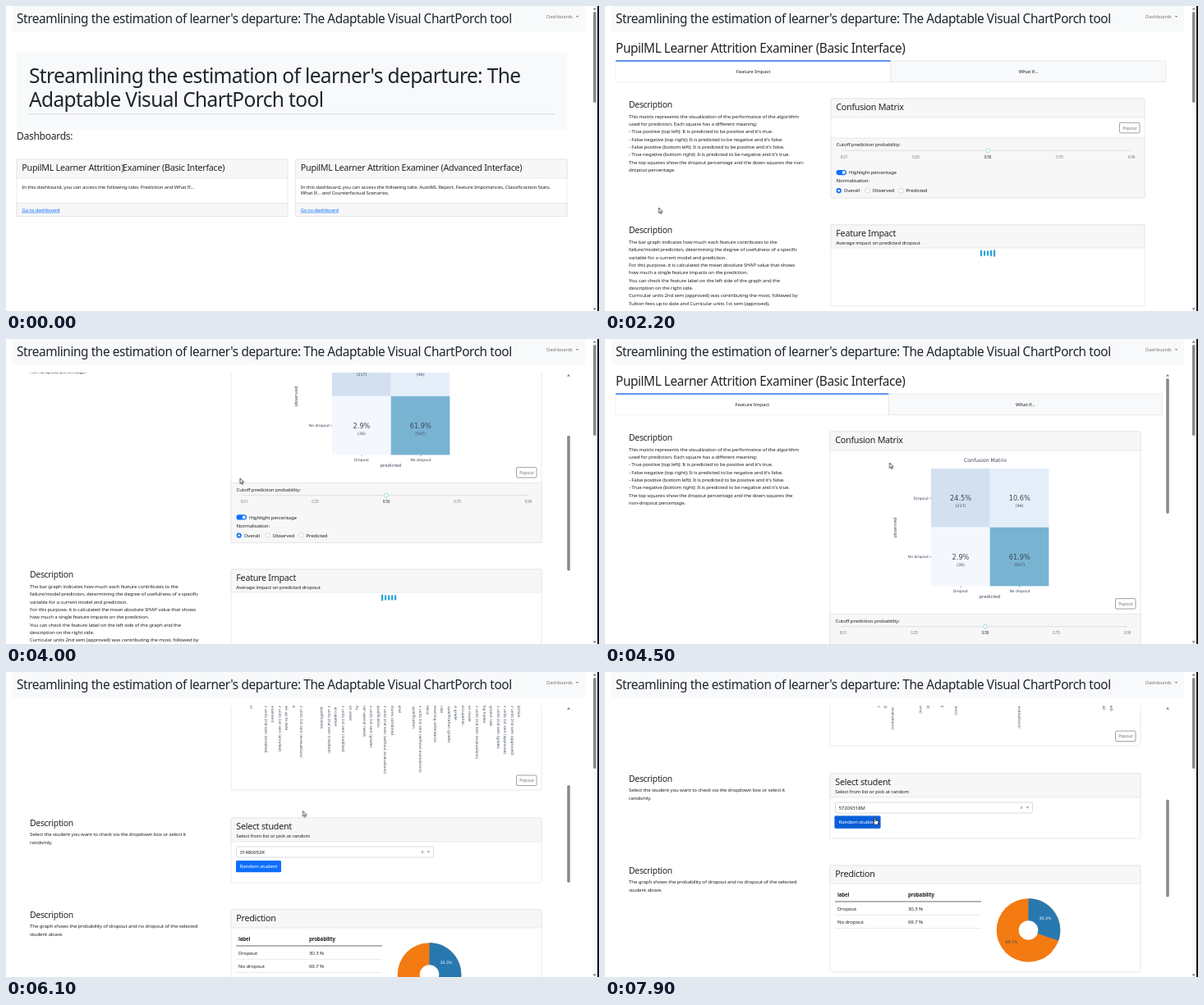
These frames come from a looping animation (722x372 px, 8000 ms). An HTML page:

```html
<!DOCTYPE html>
<html lang="en">
<head>
<meta charset="utf-8">
<title>Dashboard walkthrough</title>
<style>
@property --s { syntax: "<number>"; inherits: true; initial-value: 0; }
html, body { margin: 0; height: 100%; overflow: hidden; background: #fff; }
svg { display: block; width: 722px; height: 372px; }
text { font-family: "Noto Sans", sans-serif; letter-spacing: -.026em; fill: #212529; white-space: pre; }
.plot { font-family: "DejaVu Sans", sans-serif; letter-spacing: 0; fill: #3c4858; }
.mid { text-anchor: middle; }
.mute { fill: #777; }
.link { fill: #0d6efd; text-decoration: underline; }
.bold { font-weight: 700; }
.white { fill: #fff; }

.home, .load, .basic, .whatif, .matrix, .before, .after, .wait, .bars, .ibeam, .arrow, .hand {
  animation: 8s step-end infinite;
}
.home { animation-name: home; }
.load { animation-name: load; }
.basic { animation-name: basic; }
.whatif { animation-name: whatif; }
.matrix { animation-name: matrix; }
.before { animation-name: before; }
.after { animation-name: after; }
.wait { animation-name: wait; }
.bars { animation-name: bars; }
.ibeam { animation-name: ibeam; }
.arrow { animation-name: arrow; }
.hand { animation-name: hand; }
@keyframes home { 0% { opacity: 1 } 15%, 100% { opacity: 0 } }
@keyframes load { 0% { opacity: 0 } 15% { opacity: 1 } 31.25%, 100% { opacity: 0 } }
@keyframes basic { 0% { opacity: 0 } 31.25% { opacity: 1 } 67.5%, 100% { opacity: 0 } }
@keyframes whatif { 0% { opacity: 0 } 67.5%, 100% { opacity: 1 } }
@keyframes matrix { 0% { opacity: 0 } 37.5%, 100% { opacity: 1 } }
@keyframes before { 0% { opacity: 1 } 97.5%, 100% { opacity: 0 } }
@keyframes after { 0% { opacity: 0 } 97.5%, 100% { opacity: 1 } }
@keyframes wait { 0% { opacity: 1 } 71.25%, 100% { opacity: 0 } }
@keyframes bars { 0% { opacity: 0 } 71.25%, 100% { opacity: 1 } }
@keyframes ibeam { 0% { opacity: 1 } 1.25%, 100% { opacity: 0 } }
@keyframes arrow { 0% { opacity: 0 } 1.25% { opacity: 1 } 11.25% { opacity: 0 } 16.25% { opacity: 1 } 95%, 100% { opacity: 0 } }
@keyframes hand { 0% { opacity: 0 } 11.25% { opacity: 1 } 16.25% { opacity: 0 } 95%, 100% { opacity: 1 } }

.scroll1 { animation: scroll1 8s linear infinite; }
.scroll2 { animation: scroll2 8s linear infinite; }
.page { transform: translateY(calc(var(--s) * -1px)); }
.thumb { transform: translateY(calc(var(--s) * var(--k) * 1px)); }
@keyframes scroll1 {
  0%, 44.9% { --s: 0 }
  45%, 46.2% { --s: 78 }
  48.75%, 51.25% { --s: 160 }
  54%, 100% { --s: 0 }
}
@keyframes scroll2 {
  0%, 71.25% { --s: 0 }
  75.5%, 77.5% { --s: 275 }
  85.5%, 89% { --s: 709 }
  94%, 100% { --s: 329 }
}

.cursor { animation: move 8s linear infinite; }
@keyframes move {
  0%, 1.25% { transform: translate(142px, 198px) }
  10%, 16.25% { transform: translate(55px, 253px) }
  24%, 31.25% { transform: translate(65.5px, 246px) }
  36.25%, 46.25% { transform: translate(238.5px, 184px) }
  55%, 57.5% { transform: translate(346.5px, 151px) }
  62.5%, 64.9% { transform: translate(433px, 81px) }
  65%, 68% { transform: translate(434px, 82px) }
  75%, 91% { transform: translate(361.5px, 169.5px) }
  96%, 100% { transform: translate(328px, 178px) }
}
.spin rect { transform-box: fill-box; transform-origin: center; animation: pulse .8s ease-in-out infinite; }
@keyframes pulse { 0%, 50%, 100% { transform: none } 25% { transform: scaleY(1.35) } }
</style>
</head>
<body>
<svg id="stage" viewBox="0 0 722 372" xmlns="http://www.w3.org/2000/svg"></svg>
<script>
const BASE = 6.15, H3 = 10.75, H2 = 15.35;
const GRAY = '#f7f7f7', LINE = '#dfe1e3', BLUE = '#0d6efd';
const LEAD = "Streamlining the estimation of learner's departure: The";
const REST = 'Adaptable Visual ChartPorch tool';
const APP = 'PupilML Learner Attrition Examiner';
const IDS = ['31480652K', '57209318M'];

// y is the vertical middle of the capitals
const text = (x, y, size, str, cls = '', extra = '') =>
  `<text x="${x}" y="${(y + size * .36).toFixed(2)}" font-size="${size}" class="${cls}" ${extra}>${str}</text>`;
const rect = (x, y, w, h, fill, stroke = 'none', rx = 0) =>
  `<rect x="${x}" y="${y}" width="${w}" height="${h}" fill="${fill}" stroke="${stroke}" stroke-width=".7" rx="${rx}"/>`;
const hline = (x1, x2, y, color = LINE, w = .7) =>
  `<path d="M${x1} ${y}H${x2}" stroke="${color}" stroke-width="${w}"/>`;
const dot = (x, y, r, fill, stroke = 'none', w = .7) =>
  `<circle cx="${x}" cy="${y}" r="${r}" fill="${fill}" stroke="${stroke}" stroke-width="${w}"/>`;
const group = (cls, body, extra = '') => `<g class="${cls}" ${extra}>${body}</g>`;
const lines = (x, y, rows, step = 9.35) =>
  rows.map((row, i) => text(x, y + i * step, BASE, row)).join('');
const caret = (x, y, fill = '#888') => `<path d="M${x - 1.8} ${y - 1}h3.6l-1.8 2z" fill="${fill}"/>`;
const expand = s => s.replace(/^C(\d)/, (_, n) => `Curricular units ${n}${n == 1 ? 'st' : 'nd'} sem`);

function card(x, y, w, h, head, title, sub) {
  return rect(x, y, w, h, '#fff', LINE, 1.5) + rect(x, y, w, head, GRAY, LINE, 1) +
    text(x + 6.3, y + 10, H3, title) + (sub ? text(x + 6.3, y + 21.5, BASE, sub) : '');
}

const popout = (right, y) => rect(right - 24.5, y, 24.5, 12.5, '#fff', '#777', 1.5) +
  text(right - 12.2, y + 6.3, 5.3, 'Popout', 'mid mute');

function spinner(x, y) {
  let out = '';
  for (let i = 0; i < 5; i++) {
    const h = i ? 6 : 7.5;
    out += `<rect x="${x + i * 4}" y="${y - h / 2}" width="2.2" height="${h}" fill="#29a3db" style="animation-delay:${i * .1 - .8}s"/>`;
  }
  return group('spin', out);
}

function tabs(right, active) {
  const half = (right - 13) / 2;
  const tab = (name, i) => {
    const x = 13 + i * half, on = i === active;
    return rect(x, 67, half, 25.5, on ? '#fff' : '#f8f9fa', on ? '#eceef0' : LINE) +
      (on ? hline(x, x + half, 67, '#2f74e8', 1.5) : '') +
      text(x + half / 2, 80, BASE, name, 'mid');
  };
  return text(13, 51, H2, APP + ' (Basic Interface)') + tab('Feature Impact', 0) + tab('What if...', 1);
}

function confusion() {
  const cells = [[397, 158, '#d2e0f0', '24.5%', 217], [468.7, 158, '#e5eff9', '10.6%', 94],
    [397, 229.7, '#f4f8fe', '2.9%', 26], [468.7, 229.7, '#79b3d2', '61.9%', 547]];
  let out = text(463, 148, 6.2, 'Confusion Matrix', 'plot mid');
  for (const [x, y, fill, pct, n] of cells)
    out += rect(x, y, 71.7, 71.7, fill) + text(x + 36, y + 36.2, 8.2, pct, 'plot mid') +
      text(x + 36, y + 45.3, 4.8, `(${n})`, 'plot mid');
  ['Dropout', 'No dropout'].forEach((name, i) => {
    const x = 433 + i * 72, y = 194 + i * 71.7;
    out += text(394, y, 4.5, name, 'plot', 'text-anchor="end"') + hline(395, 397, y, '#555', .6) +
      text(x, 307.5, 4.5, name, 'plot mid') + `<path d="M${x} 301.5v1.8" stroke="#555" stroke-width=".6"/>`;
  });
  return out + text(468.5, 314, 5.4, 'predicted', 'plot mid') +
    text(0, 0, 5.4, 'observed', 'plot mid', 'transform="translate(353 230) rotate(-90)"');
}

// d: extra height taken by the plot
function matrixCard(x, w, d) {
  const right = x + w, foot = 161 + d, step = (w - 32) / 4, r = [9.7, 44.5, 85.5];
  let out = card(x, 113, w, 121 + d, 23, 'Confusion Matrix') + popout(right - 6, 142.3 + d) +
    rect(x, foot, w, 73 + d - d, GRAY, LINE) +
    text(x + 6.5, foot + 8, BASE, 'Cutoff prediction probability:') +
    hline(x + 13, right - 16, foot + 15.3, '#e3e3e3', 1.3);
  ['0.01', '0.25', '0.50', '0.75', '0.99'].forEach((v, i) =>
    out += text(x + 16 + i * step, foot + 23.3, 4.6, v, i === 2 ? 'mid' : 'mid mute'));
  out += dot(x + 16 + 2 * step, foot + 15.3, 2.5, '#fff', '#a4dbe8', 1) +
    rect(x + 6.5, foot + 39, 12.5, 6.2, BLUE, 'none', 3.1) + dot(x + 15.7, foot + 42.1, 2, '#fff') +
    text(x + 22, foot + 42.1, BASE, 'Highlight percentage') +
    text(x + 6.5, foot + 52, BASE, 'Normalisation:');
  ['Overall', 'Observed', 'Predicted'].forEach((name, i) => {
    const cx = x + r[i], cy = foot + 64.2;
    out += (i ? dot(cx, cy, 2.9, '#fff', '#c4c8cc') : dot(cx, cy, 3.1, BLUE) + dot(cx, cy, 1.3, '#fff')) +
      text(cx + 6, cy, BASE, name);
  });
  return out;
}

function impactTab(x, w, right, d, tail, plot) {
  const y = d ? 441 : 267;
  return tabs(right, 0) + text(29, 120, 10.4, 'Description') + lines(29, 134.3, [
    'This matrix represents the visualization of the performance of the algorithm',
    'used for prediction. Each square has a different meaning:',
    "- True positive (top left): It is predicted to be positive and it's true.",
    "- False negative (top right): It is predicted to be negative and it's false.",
    "- False positive (bottom left): It is predicted to be positive and it's false.",
    "- True negative (bottom right): It is predicted to be negative and it's true.", ...tail]) +
    matrixCard(x, w, d) + plot +
    text(29, y + 6.5, 10.4, 'Description') + lines(29, y + 20.8, [
    'The bar graph indicates how much each feature contributes to the',
    'failure/model prediction, determining the degree of usefulness of a specific',
    'variable for a current model and prediction.',
    'For this purpose, it is calculated the mean absolute SHAP value that shows',
    'how much a single feature impacts on the prediction.',
    'You can check the feature label on the left side of the graph and the',
    'description on the right side.',
    'Curricular units 2nd sem (approved) was contributing the most, followed by',
    'Tuition fees up to date and Curricular units 1st sem (approved).']) +
    card(x, y, w, 99, 28, 'Feature Impact', 'Average impact on predicted dropout') +
    spinner(457, y + 34.5);
}

function home() {
  const tile = (x, w, kind, rows) => card(x, 187, w, 69.5, 23, `${APP} (${kind} Interface)`) +
    rect(x, 240.5, w, 16, GRAY, LINE) + lines(x + 6.3, 220.5, rows, 7.6) +
    text(x + 6.3, 248.5, BASE, 'Go to dashboard', 'link');
  return rect(13, 57, 670, 94, '#f8f9fa') + text(28, 85, 24.5, LEAD) + text(28, 114.5, 24.5, REST) +
    hline(28, 668, 131.7, '#cfd2d4') + text(13, 158.5, 12.1, 'Dashboards:') +
    tile(13, 330, 'Basic', ['In this dashboard, you can access the following tabs: Prediction and What If...']) +
    tile(352.5, 330.5, 'Advanced', [
      'In this dashboard, you can access the following tabs: AutoML Report, Feature Importances, Classificaction Stats,',
      'What If... and Counterfactual Scenarios.']);
}

const FEATURES = ['Population', 'Debtor', 'C2 (enrolled)', 'Age at enrollment', 'C1 (enrolled)',
  'Tuition fees up to date', 'Displaced', 'C1 (evaluations)', 'GDP', 'Gender', "Mother's qualification",
  'C2 (credited)', "Mother's occupation", 'C1 (credited)', 'Application order', 'Nacionality',
  'Educational special needs', 'C1 (grade)', "Father's qualification", 'C2 (without evaluations)',
  'Other features combined', 'International', 'Course', 'Previous qualification', 'C1 (without evaluations)',
  'Marital status', 'Daytime/evening attendance', 'Inflation rate', 'Previous qualification (grade)',
  'Admission grade', "Father's occupation", 'Application mode', 'C2 (evaluations)', 'Scholarship holder',
  'Unemployment rate', 'C2 (grade)', 'C1 (approved)', 'C2 (approved)', 'Final prediction'];

const axis = names => names.map((name, i) =>
  text(0, 0, 4.4, expand(name), 'plot', `transform="translate(${(299 + i * 8.58).toFixed(1)} 297) rotate(90)"`)).join('');

function reorder(list) {
  const out = [...list];
  for (const [a, b] of [[2, 5], [7, 10], [17, 12], [19, 6], [32, 15], [35, 18]])
    [out[a], out[b]] = [out[b], out[a]];
  return out;
}

// label; value; range
const FIELDS = [
  ['C2 (approved);0;0-20', 'Age at enrollment;18;17-61', 'Unemployment rate;15,5;7.6-16.2',
    "Mother's qualification;19;1-43", 'Application mode;43;1-57', 'C2 (evaluations);0;0-33',
    'C1 (grade);0;0.0-18.0', 'GDP;-4,06;-4.1-3.5'],
  ['Tuition fees up to date;1;0-1', 'C2 (enrolled);0;0-23', 'Debtor;0;0-1', 'C2 (credited);0;0-19',
    'C1 (credited);0;0-20', 'Admission grade;133;95.0-190.0', 'Inflation rate;2,8;-0.8-3.7',
    'Previous qualification (grade);133;95.0-190.0'],
  ['C1 (approved);0;0-21', 'Course;171;33-9991', 'Displaced;0;0-1', 'Gender;0;0-1',
    "Father's qualification;19;1-43", 'Marital status;1;1-5', "Father's occupation;7;0-194", 'C1 (evaluations);0;0-33'],
  ['C2 (grade);0;0.0-17.39', 'Scholarship holder;0;0-1', "Mother's occupation;5;0-194", 'C1 (enrolled);0;0-23',
    'Application order;1;0-9', 'International;0;0-1', 'Daytime/evening attendance;1;0-1', 'C1 (without evaluations);0;0-12']];

function fields() {
  let out = '';
  FIELDS.forEach((col, c) => {
    const x = 280.5 + c * 93.5;
    let y = 779;
    for (const item of col) {
      const [label, value, range] = item.split(';'), full = expand(label);
      const rows = full === label ? [label] : full.split(/ (?=\()/);
      out += lines(x, y, rows, 9.1);
      y += (rows.length - 1) * 9.1;
      out += rect(x, y + 7.5, 84, 15, '#fff', '#d3d7db', 1.5) + text(x + 4.5, y + 15, BASE, value) +
        text(x, y + 27.6, 5.4, 'Range: ' + range, 'mute');
      y += 36.4;
    }
  });
  return out;
}

const picker = (y, w) => rect(280.5, y, w, 13, '#fff', '#ccc', 1.5) +
  IDS.map((id, i) => group(i ? 'after' : 'before', text(284.5, y + 6.6, BASE, id))).join('') +
  text(280 + w - 13, y + 6.4, 6.5, '×', 'mid mute') + caret(280 + w - 5.5, y + 6.6);

function pie(cx, cy, r, hole) {
  const a = .303 * 2 * Math.PI;
  const x = cx + r * Math.sin(a), y = cy - r * Math.cos(a);
  return dot(cx, cy, r, '#f47a12') + `<path d="M${cx} ${cy}V${cy - r}A${r} ${r} 0 0 1 ${x} ${y}Z" fill="#2878b0"/>` +
    dot(cx, cy, hole, '#fff') + text(536, 629.3, 4.7, '30.3%', 'plot mid white') +
    text(495, 658.3, 4.7, '69.7%', 'plot mid');
}

function whatIf() {
  const note = (y, ...rows) => text(29, y, 10.4, 'Description') + lines(29, y + 14, rows);
  const button = fill => rect(280, 505, 55, 14.3, fill, 'none', 1.5);
  return tabs(678, 1) +
    card(274, 113, 378, 306, 23, 'Contributions') + group('wait', spinner(454, 150)) +
    group('bars', group('before', axis(FEATURES)) + group('after', axis(reorder(FEATURES))), 'clip-path="url(#plot)"') +
    popout(646, 401) +
    note(459, 'Select the student you want to check via the dropdown box or select it', 'randomly.') +
    card(274, 453, 378, 79, 29, 'Select student', 'Select from list or pick at random') + picker(488, 240) +
    button(BLUE) + group('after', rect(279.3, 504.3, 56.4, 15.7, '#0b5ed7', '#8fbaf5', 2)) +
    text(307.5, 512.2, BASE, 'Random student', 'mid white') +
    note(571, 'The graph shows the probability of dropout and no dropout of the selected', 'student above.') +
    card(274, 565, 378, 130, 22, 'Prediction') +
    text(283, 601, BASE, 'label', 'bold') + text(369, 601, BASE, 'probability', 'bold') +
    hline(280, 458, 609, '#444', .8) + text(283, 617.5, BASE, 'Dropout') + text(369, 617.5, BASE, '30.3 %') +
    hline(280, 458, 625.4) + text(283, 633.5, BASE, 'No dropout') + text(369, 633.5, BASE, '69.7 %') +
    hline(280, 458, 641.5) + pie(515.5, 644, 38.8, 11.8) +
    note(731.5, 'In this section you can change the values of the',
      'variables of a student to see how the probability of dropout vary. You can',
      'check the value range under each variable.') +
    card(274, 723, 378, 400, 29, 'Feature Input', 'Adjust the feature values to change the prediction') +
    picker(761, 115) + fields();
}

const scroller = (cls, body, size, k) => group(cls,
  group('', group('page', body), 'clip-path="url(#view)"') +
  `<path d="M683 45.5h4l-2-2.6z" fill="#777"/>` +
  group('thumb', rect(683.2, 48, 3.6, size, '#8b8b8b', 'none', 1.8), `style="--k:${k}"`));

const chrome = rect(8, 0, 697, 31.5, '#f8f9fa') + text(13, 15, H2, LEAD + ' ' + REST) +
  text(658, 13, 5.9, 'Dashboards', 'mute') + caret(695.5, 13) +
  rect(714, 0, 6, 372, '#fafafa') + rect(715, 7, 3.6, 111, '#8b8b8b', 'none', 1.8) +
  '<path d="M714.7 4.5h4l-2-2.6zM714.7 368.5h4l-2 2.6z" fill="#777"/>' + rect(720, 0, 2, 372, '#111');

const cursor = group('cursor',
  group('ibeam', '<path d="M-1.5-4H1.5M0-4V4M-1.5 4H1.5" stroke="#333" stroke-width=".7" fill="none"/>') +
  group('arrow', '<path d="M0 0V6.5L1.5 5.2 2.5 7.5 3.5 7 2.6 4.8H4.6Z" fill="#fff" stroke="#111" stroke-width=".7"/>') +
  group('hand', '<path d="M0 .6Q.7-.4 1.4.6V3L4.6 3.7Q5.2 4 5 5L4.3 8.2H.7L-1.7 5Q-1.6 4-.6 4.7L0 5.2Z" fill="#fff" stroke="#111" stroke-width=".7"/>'));

document.getElementById('stage').innerHTML =
  '<clipPath id="view"><path d="M0 41H722V372H0Z"/></clipPath>' +
  '<clipPath id="plot"><path d="M274 280H652V402H274Z"/></clipPath>' +
  group('home', home()) +
  group('load', impactTab(275, 382, 683, 0,
    ['The top squares show the dropout percentage and the down squares the non-', 'dropout percentage.'], '')) +
  group('basic', scroller('scroll1', impactTab(274, 378, 678, 174.3,
    ['The top squares show the dropout percentage and the down squares the', 'non-dropout percentage.'],
    group('matrix', confusion())), 165, .436)) +
  group('whatif', scroller('scroll2', whatIf(), 119, .327)) +
  chrome + cursor;
</script>
</body>
</html>
```
